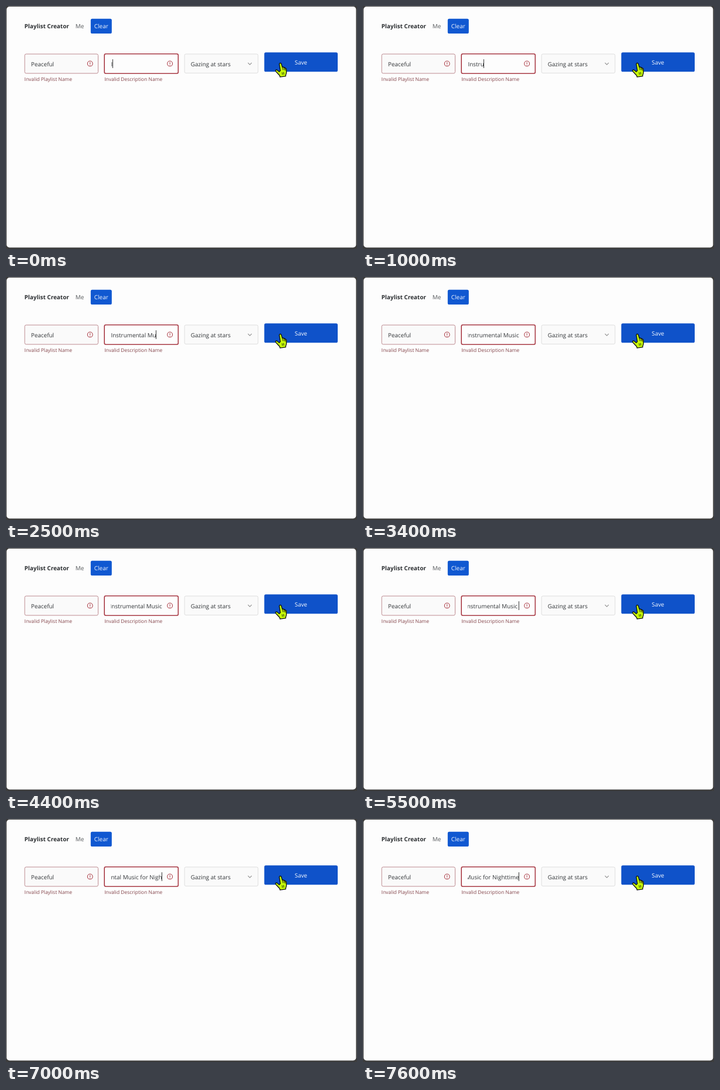
Recreate the animation shown at these times as an HTML page. Size 600 by 415 pixels, loop 8000 ms.

```html
<!DOCTYPE html>
<html lang="en">
<head>
<meta charset="utf-8">
<title>Playlist Creator</title>
<style>
  html, body { margin: 0; width: 100%; height: 100%; overflow: hidden; background: #3d3d3d; }
  svg { display: block; width: 600px; height: 415px; }
  text {
    font: 9.93px "Open Sans", "Noto Sans", sans-serif;
    fill: #333639;
    white-space: pre;
    text-rendering: geometricPrecision;
  }
  .title { font-weight: 700; fill: #2b2e31; }
  .nav { fill: #55585b; }
  .button { fill: #1058d1; }
  .label { fill: #f4f8ff; text-anchor: middle; }
  .field { fill: #fafafa; stroke: #dedede; }
  .invalid { stroke: #bd8a90; }
  .focused { fill: #fdfdfd; stroke: #a83a45; stroke-width: 1.6; }
  .error { font-size: 8.45px; fill: #84444a; }
  .icon { fill: none; stroke: #ad424c; stroke-width: 1.1; stroke-linecap: round; }
</style>
</head>
<body>
<svg viewBox="0 0 600 415">
  <defs>
    <clipPath id="inputArea"><rect x="179" y="88" width="88.3" height="21"/></clipPath>
    <g id="alert" class="icon">
      <circle r="4.4"/>
      <path d="M0-2.2V.4M0 2.2V2.3"/>
    </g>
  </defs>

  <rect width="600" height="415" fill="#3d3d3d"/>
  <rect x="1" y="1" width="597.4" height="411.5" rx="5" fill="#fdfdfd"/>

  <text class="title" x="31.6" y="38.4">Playlist Creator</text>
  <text class="nav" x="118.7" y="38.4">Me</text>
  <rect class="button" x="144.8" y="21.8" width="36" height="25.2" rx="2.6"/>
  <text class="label" x="162.8" y="38.4">Clear</text>

  <rect class="field invalid" x="32" y="82" width="125.5" height="33" rx="2.5"/>
  <text x="42.8" y="102.7">Peaceful</text>
  <use href="#alert" x="143.7" y="98.4"/>
  <text class="error" x="31.6" y="127.7">Invalid Playlist Name</text>

  <rect class="field focused" x="168.2" y="81.7" width="126.2" height="33.6" rx="2.5"/>
  <g clip-path="url(#inputArea)">
    <text id="typed" y="102.7"></text>
    <rect id="caret" y="91" width="1" height="15" fill="#383838"/>
  </g>
  <use href="#alert" x="280.2" y="98.4"/>
  <text class="error" x="168.2" y="127.7">Invalid Description Name</text>

  <rect class="field" x="305.2" y="82" width="125.6" height="32.6" rx="2.5"/>
  <text x="315.8" y="102.7">Gazing at stars</text>
  <path d="M413.6 97L416.8 100.2L420 97" fill="none" stroke="#979797" stroke-width="1.1"/>

  <rect x="441.5" y="79.3" width="125.5" height="33" rx="2.6" fill="#0f52c9"/>
  <text class="label" x="504.2" y="100.2">Save</text>

  <path d="M467.2 99.3C467.2 97.2 470 96.8 470.6 98.8L472.4 104.6C473.3 103.6 474.8 104 475 105.2
    C476 104.6 477 105.2 477.2 106.4C478.3 106 479 106.7 479.2 107.9L479.4 113.2
    C479.4 115.4 478.4 116.6 478.2 118.2L478 119.9L468.4 121.2L467.8 118.8
    C465.6 116.6 463.2 113.8 461 111.4C460 109.6 462 108.3 463.6 109.5L467 112.2L469 110.5Z"
    fill="#c8ff08" stroke="#111" stroke-width="1.35" stroke-linejoin="round"/>
  <path d="M472.4 104.8L473.3 109M475 105.4L475.7 109.3M477.2 106.7L477.7 109.8M472 113.5L472.5 117M474.6 113.2L475 116.8"
    fill="none" stroke="#111" stroke-width=".9" stroke-linecap="round"/>
</svg>
<script>
  const LOOP = 8000;
  const PHRASE = "Instrumental Music for Nighttime";
  const TEXT_LEFT = 179.5;
  const TEXT_RIGHT = 266.8;

  // [start in ms, number of typed characters]
  const TYPING = [
    [0, 1], [100, 2], [300, 4], [700, 6], [800, 5], [1000, 6], [1100, 8],
    [1300, 10], [1600, 11], [1800, 12], [2100, 13], [2500, 15], [2800, 16],
    [2900, 17], [3000, 18], [5500, 19], [5900, 21], [6000, 22], [6500, 24],
    [6700, 25], [6900, 26], [7000, 27], [7100, 28], [7500, 30], [7600, 32]
  ];
  // [start in ms, caret visible]
  const BLINK = [[0, true], [3400, false], [4300, true], [4400, false], [5300, true]];

  const typed = document.getElementById("typed");
  const caret = document.getElementById("caret");
  const valueAt = (steps, t) => steps.findLast(([start]) => start <= t)[1];

  function render(t) {
    typed.textContent = PHRASE.slice(0, valueAt(TYPING, t));
    const width = typed.getComputedTextLength();
    const left = Math.min(TEXT_LEFT, TEXT_RIGHT - width);
    typed.setAttribute("x", left);
    caret.setAttribute("x", Math.floor(left + width));
    caret.setAttribute("visibility", valueAt(BLINK, t) ? "visible" : "hidden");
  }

  const origin = performance.now();
  function tick() {
    render((performance.now() - origin) % LOOP);
    requestAnimationFrame(tick);
  }
  tick();
</script>
</body>
</html>
```
